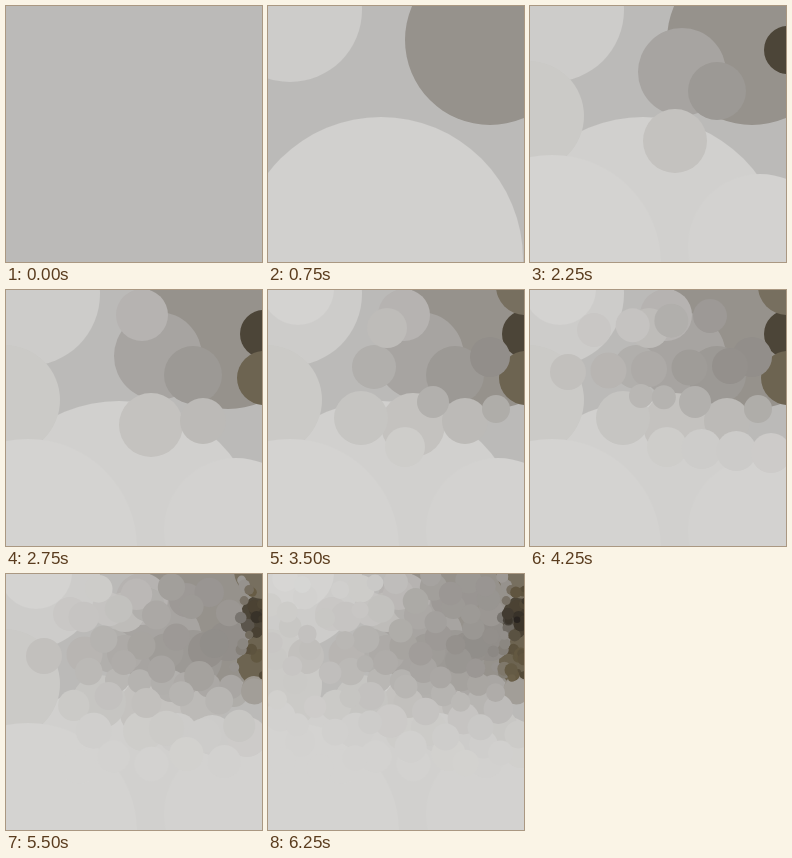
Animation of 256 by 256 pixels, one loop 8.75 s. Source, as an HTML page with a canvas:

```html
<!DOCTYPE html>
<html lang="en">
<head>
<meta charset="utf-8">
<title>Circles building a landscape</title>
<style>
  html, body { margin: 0; width: 100%; height: 100%; overflow: hidden; background: #bbbab8; }
  canvas { display: block; width: 100vw; height: 100vh; }
</style>
</head>
<body>
<canvas id="stage" width="256" height="256"></canvas>
<script>
const SIZE = 256, STEP = 250, LAST = 25, LOOP = 8750;
const ctx = document.getElementById('stage').getContext('2d');

const bell = (d, width) => Math.exp(-((d / width) ** 2));
const frac = v => v - Math.floor(v);

let seed = 7;
const random = () => {
  seed = (seed * 16807) % 2147483647;
  return seed / 2147483647;
};

// Foliage at the right edge: olive, darkest near y = 45, with small patches.
function foliage(x, y) {
  const light = 98 - 45 * bell(y - 45, 15) + 42 * Math.sin(x * 0.5) * Math.sin(y * 0.6 + x * 0.3);
  return [light, light * 0.89, light * 0.58 + 8];
}

// The scene being approximated: pale ground, dark hills, dark sky at right.
function scene(x, y) {
  if (y < 110 && x > 239 + 4 * Math.sin(y / 8)) return foliage(x, y);
  const hills = 58 * bell(y - 78, y > 78 ? 58 : 26) * Math.min(1, x / 220);
  const sky = 58 * bell(y - 15, 42) / (1 + Math.exp((140 - x) / 15));
  const haze = 12 * bell(y - 60, 50);
  const glow = 8 * bell(Math.hypot(x - 28, y), 40);
  const dark = hills + sky + haze - glow;
  return [212 - dark * 0.96, 211 - dark, 209 - dark * 1.03];
}

// Each circle takes the mean colour of the scene beneath it.
function meanColour(cx, cy, r) {
  const sum = [0, 0, 0];
  let count = 0;
  for (let u = -0.9; u < 1; u += 0.15) {
    for (let v = -0.9; v < 1; v += 0.15) {
      const x = cx + u * r, y = cy + v * r;
      if (u * u + v * v > 1 || x < 0 || y < 0 || x > SIZE || y > SIZE) continue;
      scene(x, y).forEach((c, i) => sum[i] += c);
      count++;
    }
  }
  return `rgb(${sum.map(c => Math.round(c / Math.max(1, count)))})`;
}

// Key circles as x, y, radius
const broad = [
  [113, 253, 142], [222, 34, 85], [22, 4, 72], [-1, 110, 55], [152, 66, 44], [258, 44, 24],
  [22, 258, 109], [230, 240, 72], [187, 85, 29], [145, 135, 32], [258, 88, 27], [136, 25, 26],
  [197, 131, 23], [257, -4, 29], [30, -1, 36], [93, 128, 27], [106, 77, 22], [119, 38, 20],
  [222, 67, 20], [165, 112, 16], [228, 119, 14]
];

const row = (count, x0, x1, y0, y1, r) => Array.from({ length: count }, (_, i) => {
  const t = i / (count - 1);
  return [x0 + (x1 - x0) * t, y0 + (y1 - y0) * t, r];
});

const speck = () => [257 - 24 * random() ** 1.2, 110 * random(), 3 + 4 * random()];

// Evenly scattered, shrinking circles; finer beside the foliage.
function fineCircle(_, j) {
  if (j % 4 === 0) return speck();
  const x = SIZE * frac(j * 0.7548777);
  const y = 195 * frac(j * 0.5698403) ** 1.15;
  const r = x > 224 && y < 115 ? 4 : (y > 135 ? 17 : 14) - j * 0.045;
  return [x, y, r + 2 * random()];
}

const circles = [
  ...broad,
  ...row(4, 137, 241, 157, 163, 20),
  ...row(4, 64, 180, 40, 26, 17),
  ...row(5, 38, 200, 82, 76, 18),
  ...row(7, 111, 248, 106, 114, 12),
  ...Array.from({ length: 8 }, speck),
  ...Array.from({ length: 140 }, fineCircle)
].map(([x, y, r]) => ({ x, y, r, colour: meanColour(x, y, r) }));

function countAt(step) {
  if (step <= 6) return step;
  if (step <= 19) return Math.round(6 * 1.176 ** (step - 6));
  return Math.round(49 * 1.25 ** (step - 19));
}

function draw(step) {
  ctx.fillStyle = '#bbbab8';
  ctx.fillRect(0, 0, SIZE, SIZE);
  for (const { x, y, r, colour } of circles.slice(0, countAt(step))) {
    ctx.fillStyle = colour;
    ctx.beginPath();
    ctx.arc(x, y, r, 0, Math.PI * 2);
    ctx.fill();
  }
}

const start = performance.now();
let shown = -1;
function tick() {
  const time = (performance.now() - start) % LOOP;
  const step = Math.min(LAST, Math.floor(time / STEP));
  if (step !== shown) draw(shown = step);
  requestAnimationFrame(tick);
}
tick();
</script>
</body>
</html>
```
